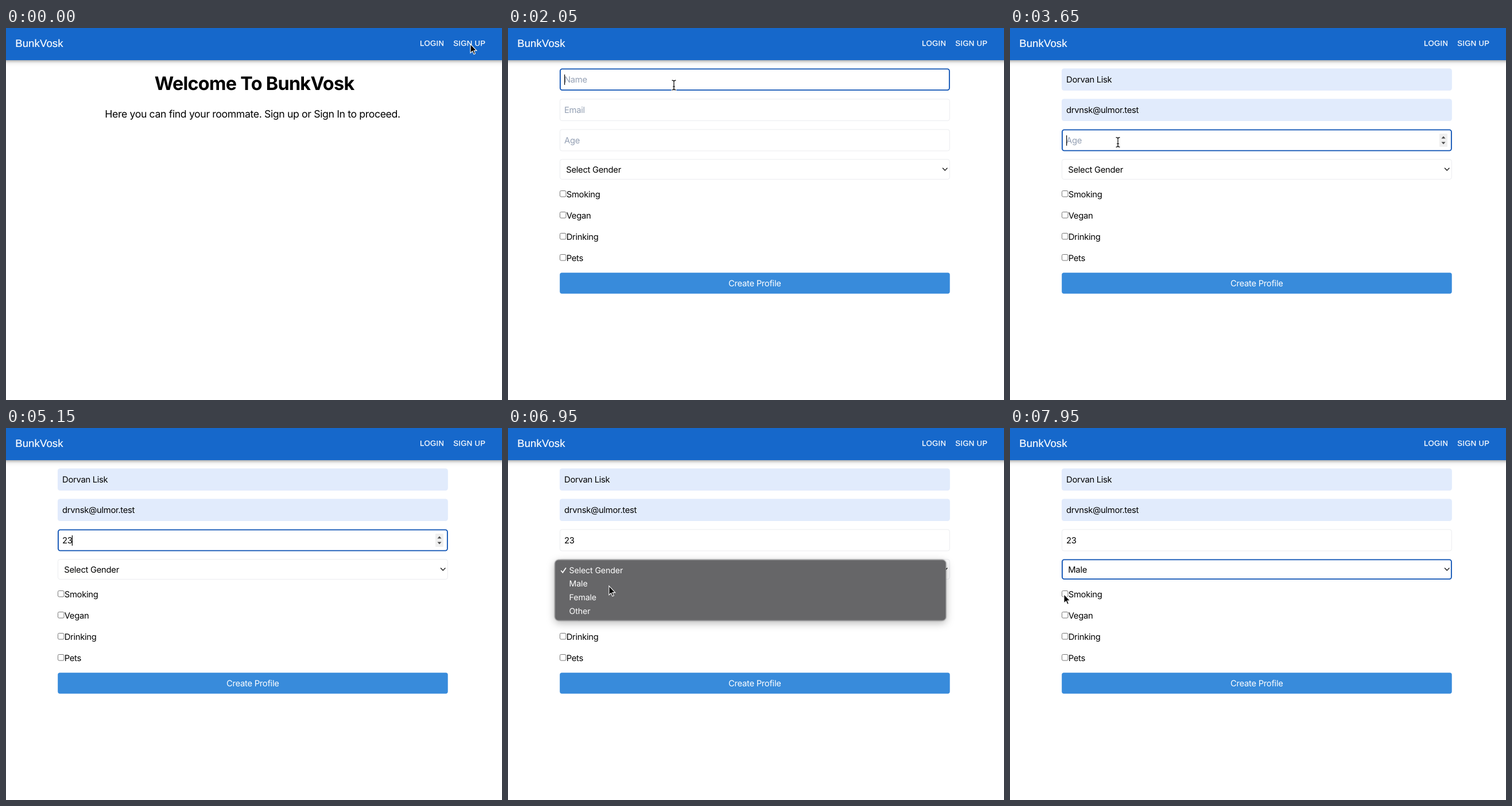
An HTML page for the animation above (8 s loop, 864 px wide and 648 px high).

```html
<!DOCTYPE html>
<html lang="en">
<head>
<meta charset="utf-8">
<title>Roommate sign up</title>
<style>
  html, body { margin: 0; width: 100%; height: 100%; overflow: hidden; background: #fff; }
  svg { display: block; width: 864px; height: 648px; }
  text { font: 14.8px Inter, "Open Sans", sans-serif; letter-spacing: -.02em; font-optical-sizing: none;
         text-rendering: geometricPrecision; white-space: pre; }
  .bar { fill: #1668cb; filter: drop-shadow(0 2px 2px rgba(0,0,0,.22)) drop-shadow(0 1px 5px rgba(0,0,0,.22)); }
  .brand, .nav { font-family: "Liberation Sans", Arial, sans-serif; fill: #fff; }
  .brand { font-size: 18.5px; letter-spacing: .008em; stroke: #fff; stroke-width: .2; }
  .nav { font-size: 13px; letter-spacing: .029em; stroke: #fff; stroke-width: .3; }
  .title { font-size: 32.3px; font-weight: 700; letter-spacing: -.021em; }
  .lead { font-size: 17.7px; letter-spacing: -.0215em; }
  .mid { text-anchor: middle; }
  .field { fill: #fff; stroke: #ebecef; }
  .field.filled { fill: #e1ebfc; stroke: #e1ebfc; }
  .field.focus { stroke: #0d52b4; stroke-width: 1.85; }
  .hint { fill: #94a0b4; }
  .preview { font-size: 12.3px; }
  .box { fill: #fff; stroke: #767676; }
  .popup { filter: drop-shadow(0 1px 1.5px rgba(0,0,0,.25)); }
  .popup text { font-size: 13px; letter-spacing: 0; fill: #e8e8ea; }
  .popup .mail { font-size: 12.3px; fill: #8e8e93; }
  .popup .mail.on { fill: #e3e3e6; }
  .menu text { font-size: 14.2px; letter-spacing: -.01em; fill: #fff; }
  .panel { fill: #666668; stroke: #8d8d8f; filter: drop-shadow(0 0 1px rgba(0,0,0,.5)) drop-shadow(0 4px 7px rgba(0,0,0,.28)); }
</style>
</head>
<body>
<svg viewBox="0 0 864 648" xmlns="http://www.w3.org/2000/svg">
  <defs>
    <clipPath id="signUpClip"><rect x="772" y="9" width="71" height="34" rx="4"/></clipPath>
    <g id="person" fill="none" stroke="#a2a2a8" stroke-width="1.3">
      <circle r="6.2"/><circle cy="-1.8" r="1.9" fill="#a2a2a8" stroke="none"/>
      <path d="M-4 4.3Q0 -.4 4 4.3Q0 7.4 -4 4.3Z" fill="#a2a2a8" stroke="none"/>
    </g>
  </defs>

  <rect class="bar" x="-20" y="-20" width="904" height="76"/>
  <text class="brand" x="16.2" y="33">BunkVosk</text>
  <text class="nav" x="720.9" y="31">LOGIN</text>
  <text class="nav" x="779.3" y="31">SIGN UP</text>
  <g clip-path="url(#signUpClip)"><circle id="ripple" cx="806" cy="29" fill="#fff"/></g>

  <g id="welcome">
    <text class="title" x="258.7" y="107.9">Welcome To BunkVosk</text>
    <text class="lead mid" x="429.5" y="156">Here you can find your roommate. Sign up or Sign In to proceed.</text>
  </g>

  <g id="form">
    <rect id="nameBox" rx="3.5"/>
    <text id="nameText" x="98"/>
    <rect id="mailBox" rx="3.5"/>
    <text id="mailText" x="98"/>
    <rect id="ageBox" rx="3.5"/>
    <text id="ageText" x="98" y="201"/>
    <g id="spinner">
      <rect x="748" y="184" width="14" height="23" rx="1" fill="#efefef"/>
      <path d="M751.5 192.5L755 188.5L758.5 192.5ZM751.5 198.5L755 202.5L758.5 198.5Z" fill="#4a4a4a"/>
    </g>
    <rect id="genderBox" rx="3.5"/>
    <text id="genderText" x="101.3" y="252"/>
    <path d="M757 243.8L761.2 248L765.4 243.8" fill="none" stroke="#111" stroke-width="1.25"/>
    <g id="checks"></g>
    <rect x="90.2" y="426.2" width="679.5" height="36.6" rx="3.7" fill="#388bdb"/>
    <text class="mid" x="429.8" y="450" fill="#fff">Create Profile</text>
    <rect id="caret" width="1.2" height="18"/>
  </g>

  <g id="popup" class="popup">
    <path d="M202 119L209.5 111.5Q212.5 109 215.5 111.5L223 119Z" fill="#2b2b2f"/>
    <rect x="192" y="118.3" width="184.4" height="173.2" rx="3.5" fill="#242328"/>
    <rect id="popupHover" x="192" y="122" width="184.4" height="59.5" fill="#39393c"/>
    <path d="M192 246H376.4" stroke="#3d3d42"/>
    <use href="#person" x="212.3" y="152"/>
    <text x="232.5" y="146">Dorvan Lisk</text>
    <text id="popupMail" x="232.5" y="167.5">drvnsk@ulmor.test</text>
    <use href="#person" x="212.3" y="211.5"/>
    <text x="232.5" y="205.3">Dorvan L</text>
    <text class="mail" x="232.5" y="227.4">drvnsk@pelm.test</text>
    <circle cx="212.3" cy="269.3" r="7" fill="#98989d"/>
    <text x="232.5" y="274" style="fill:#98989d">Manage...</text>
  </g>

  <g id="menu" class="menu">
    <rect class="panel" x="82" y="230" width="680.5" height="105" rx="6"/>
    <rect id="menuHover" x="87" width="670.5" height="23.6" rx="4" fill="#4f80e6"/>
    <path d="M92.3 248.3L95.3 251.8L101 243.4" fill="none" stroke="#fff" stroke-width="1.7"/>
    <g id="options"></g>
  </g>

  <g id="cursor">
    <path id="arrow" d="M0 0V15.6L3.6 12.3L6 17.8L8.4 16.8L6.1 11.4H10.8Z" stroke="#fff" stroke-width="1.1"/>
    <g id="ibeam" fill="none" stroke-linecap="round">
      <path d="M-3 -8.3Q0 -8.3 0 -6Q0 -8.3 3 -8.3M0 -6V6M-3 8.3Q0 8.3 0 6Q0 8.3 3 8.3M-1.5 2.5H1.5" stroke="#fff" stroke-width="3"/>
      <path d="M-3 -8.3Q0 -8.3 0 -6Q0 -8.3 3 -8.3M0 -6V6M-3 8.3Q0 8.3 0 6Q0 8.3 3 8.3M-1.5 2.5H1.5" stroke="#000" stroke-width="1.2"/>
    </g>
    <path id="hand" d="M-1.5 9V.8Q0 -1.2 1.5 .8V6Q3.2 4.6 4.4 6.4Q6 5.2 7.2 7Q9 6.2 9.6 8.2V12Q9.4 14.6 8 16.6H.2Q-1 14.4 -4.8 10.6Q-5.4 8.4 -3.4 8.4Z" fill="#000" stroke="#fff" stroke-width="1.1"/>
  </g>
</svg>

<script>
const LOOP = 8000, STEP = 50;
const el = Object.fromEntries([...document.querySelectorAll('svg [id]')].map(node => [node.id, node]));

// Cursor path: time, x, y
const path = [
  [250, 809, 28], [650, 806, 29], [1150, 806, 29], [1650, 440, 90], [2000, 289, 99.5],
  [2500, 289, 99.5], [2850, 271, 169], [2950, 271, 169], [3050, 272, 169], [3200, 272, 169],
  [3600, 188, 199], [3900, 188, 199], [4150, 187, 198], [5600, 187, 198], [5900, 183, 248],
  [6200, 183, 248], [6300, 183, 268], [6750, 177, 272], [6900, 177, 272], [7150, 167, 303],
  [7400, 138, 372], [7750, 102, 309], [7950, 94, 289.5]
];
const fields = { nameBox: [71, 38], mailBox: [124, 38], ageBox: [177, 37.5], genderBox: [229, 35] };

el.checks.innerHTML = ['Smoking', 'Vegan', 'Drinking', 'Pets'].map((label, i) =>
  `<rect class="box" x="90.5" y="${283.5 + 37 * i}" width="10.5" height="10.5" rx="2"/>
   <text x="101.7" y="${294.7 + 37 * i}">${label}</text>`).join('');
el.options.innerHTML = ['Select Gender', 'Male', 'Female', 'Other'].map((label, i) =>
  `<text x="106.6" y="${252.6 + 23.7 * i}">${label}</text>`).join('');

const clamp = v => Math.min(1, Math.max(0, v));
const show = (node, on) => node.setAttribute('display', on ? 'inline' : 'none');
const set = (node, attrs) => { for (const k in attrs) node.setAttribute(k, attrs[k]); };
const inside = (x, y, left, top, right, bottom) => x >= left && x <= right && y >= top && y <= bottom;

function cursorAt(t) {
  const i = path.findIndex(key => key[0] > t);
  if (i === 0) return path[0].slice(1);
  if (i < 0) return path[path.length - 1].slice(1);
  const [t0, x0, y0] = path[i - 1], [t1, x1, y1] = path[i];
  const p = (t - t0) / (t1 - t0), e = p * p * (3 - 2 * p);
  return [x0 + (x1 - x0) * e, y0 + (y1 - y0) * e];
}

function drawField(id, focused, filled) {
  const [top, height] = fields[id], inset = focused ? .92 : .5;
  set(el[id], {
    x: 90 + inset, y: top + inset - .6, width: 679.8 - 2 * inset, height: height - 2 * inset + .6,
    class: 'field' + (filled ? ' filled' : '') + (focused ? ' focus' : '')
  });
}

function drawText(node, content, cls, y) {
  node.textContent = content;
  set(node, y ? { class: cls, y } : { class: cls });
}

function drawCaret(t) {
  let since = null, x = 98, y = 81;
  if (t >= 2050 && t < 3650) {
    since = t >= 3250 ? 3250 : 2050;
    if (t >= 3250) x = 98 + el.nameText.getComputedTextLength();
  } else if (t >= 3650 && t < 5950) {
    since = t >= 5150 ? 5150 : t >= 4950 ? 4950 : 3650;
    y = 187;
    if (t >= 4950) x = 98 + el.ageText.getComputedTextLength() - .8;
  }
  show(el.caret, since !== null && (t - since) % 1000 < 500);
  set(el.caret, { x, y });
}

function drawForm(t) {
  const preview = t >= 2700, filled = t >= 3250;
  const textClass = filled ? '' : preview ? 'preview' : 'hint';
  drawField('nameBox', t >= 2050 && t < 3650, preview);
  drawField('mailBox', false, preview);
  drawField('ageBox', t >= 3650 && t < 5950, false);
  drawField('genderBox', t >= 7250, false);
  drawText(el.nameText, preview ? 'Dorvan Lisk' : 'Name', textClass, 95);
  drawText(el.mailText, preview ? 'drvnsk@ulmor.test' : 'Email', textClass, 148);
  drawText(el.ageText, t < 4950 ? 'Age' : t < 5150 ? '2' : '23', t < 4950 ? 'hint' : '');
  drawText(el.genderText, t < 7250 ? 'Select Gender' : 'Male', '');
  show(el.spinner, t >= 3550 && t < 5950);
  drawCaret(t);
}

function drawOverlays(t) {
  show(el.popup, t >= 2150 && t < 3250);
  show(el.popupHover, t >= 2700);
  set(el.popupMail, { class: t >= 2700 ? 'mail on' : 'mail' });

  show(el.menu, t >= 6000 && t < 7250);
  set(el.menu, { opacity: 1 - clamp((t - 7050) / 162) });
  set(el.menuHover, { y: t < 6350 ? 235.5 : 259 });
  show(el.menuHover, t < 6950 || t >= 7000);

  const grow = clamp((t - 850) / 550);
  set(el.ripple, {
    r: 8 + 34 * (1 - (1 - grow) ** 2),
    opacity: t < 850 ? 0 : .3 * (1 - clamp((t - 950) / 550))
  });
}

function drawCursor(t) {
  const [x, y] = cursorAt(t);
  const inField = ['nameBox', 'mailBox', 'ageBox'].some(id =>
    inside(x, y, 90, fields[id][0], 770, fields[id][0] + fields[id][1]));
  const overPopup = t >= 2150 && t < 3250 && inside(x, y, 192, 118, 377, 292);
  const kind = t >= 250 && inside(x, y, 772, 9, 843, 43) ? 'hand'
    : t >= 950 && inField && !overPopup ? 'ibeam' : 'arrow';
  for (const k of ['arrow', 'ibeam', 'hand']) show(el[k], k === kind);
  set(el.cursor, { transform: `translate(${x} ${y})` });
  show(el.cursor, t < 4950 || t >= 5650);
}

function render(now) {
  const t = Math.floor((now % LOOP) / STEP) * STEP;
  show(el.welcome, t < 950);
  show(el.form, t >= 950);
  drawForm(t);
  drawOverlays(t);
  drawCursor(t);
}

const start = performance.now();
function tick() {
  render(performance.now() - start);
  requestAnimationFrame(tick);
}
tick();
</script>
</body>
</html>
```
